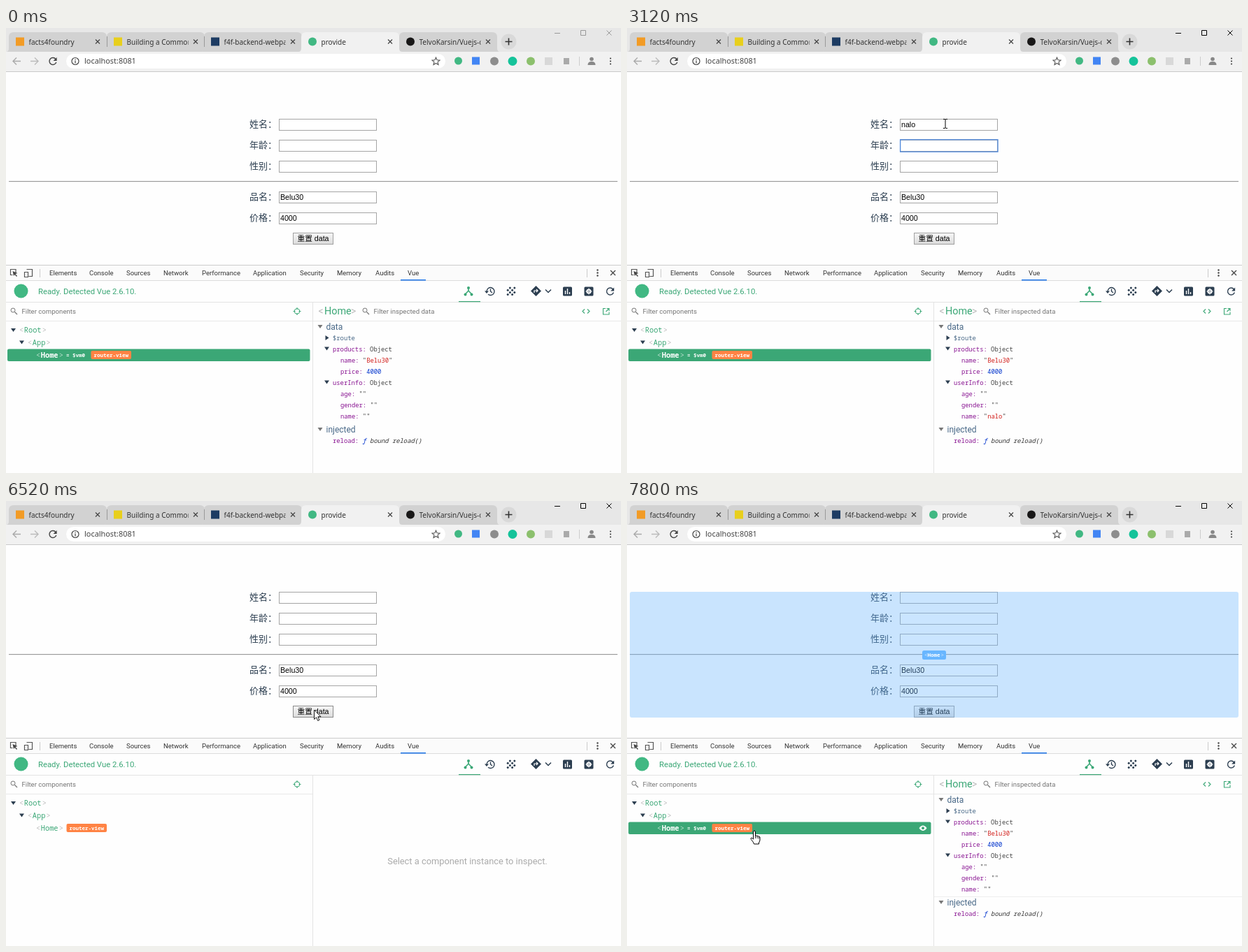
Animation of 879 by 637 pixels, one loop 8000 ms. Source, as an HTML page:

```html
<!DOCTYPE html>
<html lang="zh">
<head>
<meta charset="utf-8">
<title>provide</title>
<style>
html, body { margin: 0; width: 100%; height: 100%; overflow: hidden; background: #fefefe; }
#stage { position: fixed; left: 0; top: 0; }
text { white-space: pre; }
.ui { font-family: "Noto Sans", "Open Sans", sans-serif; }
.rb { font-family: Roboto, sans-serif; }
.mono { font-family: "Noto Sans Mono", "DejaVu Sans Mono", monospace; }
.form { font-family: "Liberation Sans", "Noto Sans CJK SC", "Noto Sans CJK", sans-serif; }
.cjk { font-family: "Noto Sans CJK SC", "Noto Sans CJK", sans-serif; }
.b { font-weight: bold; }
</style>
</head>
<body>
<svg id="stage" width="879" height="637" viewBox="0 0 879 637"></svg>
<script>
const LOOP = 8000;
const GREEN = '#3ba776', DARK = '#2c3e50', KEY = '#881391';
const FIELD_Y = [130, 160, 190, 234, 264];

const esc = s => s.replace(/</g, '&lt;').replace(/>/g, '&gt;');
const text = (x, y, s, size, fill, cls, more = '') =>
  `<text x="${x}" y="${y}" font-size="${size}" fill="${fill}" class="${cls}" ${more}>${esc(s)}</text>`;
const rect = (x, y, w, h, fill, more = '') =>
  `<rect x="${x}" y="${y}" width="${w}" height="${h}" fill="${fill}" ${more}/>`;
const disc = (x, y, r, fill, more = '') => `<circle cx="${x}" cy="${y}" r="${r}" fill="${fill}" ${more}/>`;
const line = (d, stroke, w = 1, more = '') =>
  `<path d="${d}" fill="none" stroke="${stroke}" stroke-width="${w}" ${more}/>`;
const shape = (d, fill, more = '') => `<path d="${d}" fill="${fill}" ${more}/>`;
const at = (x, y, inner) => `<g transform="translate(${x} ${y})">${inner}</g>`;
const group = (id, inner) => `<g id="${id}">${inner}</g>`;
const cross = (x, y, r, color, w) => line(`M${x - r} ${y - r}l${2 * r} ${2 * r}m0 ${-2 * r}l${-2 * r} ${2 * r}`, color, w);
const dots = (x, y, gap, r, fill) => [-1, 0, 1].map(i => disc(x, y + i * gap, r, fill)).join('');
const down = (x, y, fill) => shape(`M${x - 3.5} ${y - 2}h7l-3.5 5z`, fill);
const search = (x, y) => line(`M${x + 1.5} ${y + 1.5}l3.5 3.5`, '#777', 1.3) + disc(x - 1, y - 1, 3, 'none', 'stroke="#777"');
const refresh = (x, y, color) => at(x, y, line('M4 -3A5 5 0 1 0 4.8 1.5', color, 1.4) + shape('M5.6 -5.6v5h-5z', color));

// Coloured monospace runs on one line
const code = (x, y, runs, id = '') => `<text x="${x}" y="${y}" font-size="8.85" class="mono">` +
  runs.map(([s, fill, more = '']) => `<tspan fill="${fill}" ${more}>${esc(s)}</tspan>`).join('') +
  (id && `<tspan id="${id}" fill="#444"></tspan>`) + '</text>';
const tag = (x, y, name, cls = '') => text(x, y, '<', 10.3, '#bbb', 'mono') +
  text(x + 6.8, y, name, 10.3, GREEN, 'mono ' + cls) + text(x + 8 + name.length * 6.2, y, '>', 10.3, '#bbb', 'mono');
const badge = x => rect(x, 462, 57.5, 12, '#ff8344', 'rx="2"') + text(x + 4, 470.6, 'router-view', 7.5, '#fff', 'mono b');

function browserChrome() {
  const tabs = [
    [4, 'facts4foundry', '#f29b25'], [144, 'Building a Common Event', '#e8cf1c'],
    [283, 'f4f-backend-webpack', '#1d3c63'], [562, 'TelvoKarsin/Vuejs-demo', '#181717'], [422, 'provide', '#41b883']];
  const tabSvg = tabs.map(([x, title, color], i) => {
    const bg = i === 4 ? '#f1f1f1' : '#d2d2d2';
    const icon = i > 2 ? disc(x + 16, 19.5, 6, color) : rect(x + 10, 13.5, 12, 12, color);
    return shape(`M${x - 4} 34q4 0 4 -5V13q0 -7 7 -7h126q7 0 7 7v16q0 5 4 5z`, bg) + icon +
      `<svg x="${x + 28.5}" y="8" width="88" height="24">${text(0, 15.5, title, 10, '#333', 'ui')}</svg>` +
      cross(x + 127, 19.5, 3, '#444', 1.2);
  }).join('');
  const ext = disc(646.5, 47, 5.5, '#41b883') + rect(666, 41.5, 11, 11, '#4285f4') + disc(698, 47.5, 6, '#8d8d8d') +
    disc(724, 47.5, 6.5, '#15c39a') + disc(750, 47.5, 6, '#8cc06d') + rect(770, 42, 11, 11, '#d8d8d8') + rect(797, 43, 8, 9, '#aaa');
  return rect(0, 0, 879, 34, '#e7e7e7') + tabSvg + line('M144.5 12v15M283.5 12v15', '#999') +
    disc(718.5, 19.5, 11, '#d9d9d9') + line('M713.5 19.5h10M718.5 14.5v10', '#333', 1.6) +
    group('winButtons', line('M784 7.5h8M821.5 3.5h7v7h-7zM858.5 3.5l7 7m0 -7l-7 7', 'currentColor')) +
    rect(0, 34, 879, 28, '#f1f1f1') + rect(0, 62, 879, 1, '#c9c9c9') +
    line('M21 47.5h-11m5 -5l-5 5l5 5', '#aaa', 1.4) + line('M35 47.5h11m-5 -5l5 5l-5 5', '#bbb', 1.4) + refresh(67, 47.5, '#444') +
    rect(86, 37, 542, 21, '#fff', 'rx="10.5"') + disc(99, 47.5, 5, 'none', 'stroke="#444" stroke-width="1.2"') +
    line('M99 46.5v4M99 44.2v1.2', '#444', 1.2) + text(112, 51.3, 'localhost:8081', 10.9, '#444', 'ui') +
    line('M614.5 42.2l1.5 3.6 4 .3-3 2.6 1 3.8-3.5-2-3.5 2 1-3.8-3-2.6 4-.3z', '#555', 1.1) +
    ext + line('M819.5 41v13', '#ccc') + disc(837, 44.5, 2.8, '#888') + shape('M831.5 53q0 -5 5.5 -5t5.5 5z', '#888') +
    dots(864, 47.5, 4, 1.1, '#444');
}

function page() {
  const labels = ['姓名：', '年龄：', '性别：', '品名：', '价格：'];
  const fixed = ['', '', '', 'Belu30', '4000'];
  return labels.map((label, i) => {
    const y = FIELD_Y[i];
    return text(348, y + 12.4, label, 13, DARK, 'cjk') +
      rect(390.5, y + .5, 139, 16, '#fff', 'stroke="#a5a5a5"') +
      text(392, y + 12, fixed[i], 10.67, '#000', 'form', `id="field${i}"`);
  }).join('') +
    rect(390.6, 129.8, 139.4, 17.4, 'none', 'id="focus" stroke="#4d87dc" stroke-width="1.3"') +
    rect(0, 0, 1, 12.5, '#000', 'id="caret"') + rect(392, 144, 0, 1, '#000', 'id="compose"') +
    rect(4, 219, 870, 1, '#9a9a9a') + rect(4, 220, 870, 1, '#eee') +
    rect(410.5, 293.5, 57, 16, 'url(#btn)', 'id="button" stroke="#a0a0a0"') +
    text(416.5, 305.3, '重置 data', 10.67, '#000', 'form');
}

function devtoolsFrame() {
  const tabs = [[62, 'Elements'], [119, 'Console'], [172, 'Sources'], [225, 'Network'], [280, 'Performance'],
    [353, 'Application'], [420, 'Security'], [473, 'Memory'], [528, 'Audits'], [574, 'Vue']];
  const cells = [0, 1, 2, 3];
  const grain = cells.map(row => cells.filter(col => (row + col) % 2).map(col =>
    disc(717.2 + col * 3.2, 372 + row * 3.2, 1.5, DARK)).join('')).join('');
  return rect(0, 339, 879, 1, '#ccc') + rect(0, 340, 879, 21, '#fbfbfb') + rect(0, 361, 879, 1, '#ddd') +
    line('M14 351v-5.5H6.500v8h3', '#555', 1.2) + shape('M9.500 348l7 3-3 1 2.500 3-1 1-2.500-3-1.500 2z', '#444') +
    line('M29.500 345.500h8v10h-5M26.500 349.500h5v7h-5z', '#555', 1.2) + line('M48.5 345v12M830.5 345v12', '#ccc') +
    tabs.map(([x, s]) => text(x, 354.4, s, 9.5, '#333', 'rb')).join('') + rect(564, 360, 36, 1.5, '#1a73e8') +
    dots(845.5, 350.5, 4, 1.2, '#444') + cross(867.5, 350.5, 3.5, '#444', 1.3) +
    disc(21.500, 376.500, 10, '#41b883') + text(46, 381.4, 'Ready. Detected Vue 2.6.10.', 11.3, GREEN, 'rb') +
    line('M661 371v5l-4.500 5M661 376l4.500 5', GREEN, 1.6) + disc(661, 372, 2, GREEN) + disc(656.5, 381.500, 2, GREEN) + disc(665.5, 381.500, 2, GREEN) +
    line('M687 377a5.500 5.500 0 1 1 2 4.300M692.500 373.500v3.500l2.500 2', DARK, 1.4) + shape('M684 376.500h6l-3 3.500z', DARK) + grain +
    shape('M757.500 369l7.500 7.500-7.500 7.500-7.500-7.500z', DARK) + line('M755 379v-3h4.500m-1.500-2l2 2-2 2', '#fff', 1.2) +
    line('M771 374.500l4 4 4-4', DARK, 1.5) + rect(796, 370.5, 13, 13, DARK, 'rx="1.5"') + line('M799.500 381v-5M802.500 381v-8M805.500 381v-3', '#fff', 1.4) +
    rect(826.5, 370.5, 13, 13, DARK, 'rx="1.5"') + disc(833, 377, 2.7, 'none', 'stroke="#fff" stroke-width="1.8"') +
    line('M833 372.500v9M828.500 377h9', '#fff', .9) + refresh(863.5, 377, DARK) +
    rect(0, 392, 879, 1, '#e3e3e3') + rect(647, 391, 31, 1.2, GREEN) +
    rect(0, 419, 438, 1, '#e9e9e9') + rect(438, 393, 1, 244, '#e3e3e3') +
    search(11, 405) + text(22.5, 408.8, 'Filter components', 9.6, '#757575', 'rb') +
    disc(416, 405.500, 3.8, 'none', `stroke="${GREEN}"`) + line('M416 400v3m0 5v3M410.500 405.500h3m5 0h3', GREEN);
}

function tree() {
  return down(10.5, 432, DARK) + tag(19, 436.3, 'Root') + down(22.5, 449.500, DARK) + tag(31, 454, 'App') +
    group('rowPlain', rect(2, 459.5, 432.5, 17.5, '#e5f3ec', 'rx="2" id="rowHover"') + tag(43, 471.7, 'Home') + badge(86.5)) +
    group('rowSelected', rect(2, 459.5, 432.5, 17.5, GREEN, 'rx="2"') +
      text(43, 471.7, '<', 10.3, '#b9e0cd', 'mono') + text(49.8, 471.7, 'Home', 10.3, '#fff', 'mono b') +
      text(75.8, 471.7, '>', 10.3, '#b9e0cd', 'mono') + text(86, 471.2, '= $vm0', 7.5, '#fff', 'mono b') + badge(121.5)) +
    group('eye', shape('M417.500 468.300q5.500-7.500 11 0q-5.500 7.500-11 0z', '#fff') + disc(423, 468.300, 2, GREEN));
}

function inspector() {
  const empty = text(659.5, 519.5, 'Select a component instance to inspect.', 12.85, '#aaa', 'rb', 'text-anchor="middle"');
  const obj = (y, name) => down(458.5, y - 4, DARK) + code(467, y, [[name + ':', KEY], [' Object', '#444']]);
  return group('empty', empty) + group('details',
    rect(439, 419, 440, 1, '#e9e9e9') + text(446.5, 410, '<', 14, '#bbb', 'rb') + text(455, 410, 'Home', 14.4, GREEN, 'rb') +
    text(493, 410, '>', 14, '#bbb', 'rb') + search(514, 405) + text(525.5, 408.8, 'Filter inspected data', 9.6, '#757575', 'rb') +
    line('M827 402.500l-3 3 3 3M831 402.500l3 3-3 3', GREEN, 1.1) + line('M857 401.500h-3.500v8.500h8.500v-3.500M857.500 406l4.500-4.500m-3.500 0h3.500v3.500', GREEN, 1.1) +
    down(449, 427, '#777') + text(457.5, 431.5, 'data', 12, '#486887', 'rb') +
    shape('M456.500 440l5 3.500-5 3.500z', DARK) + code(467, 446.6, [['$route', '#486887']]) +
    obj(462.6, 'products') + code(478, 478.6, [['name: ', KEY], ['"', '#444'], ['Belu30', '#d2201c'], ['"', '#444']]) +
    code(478, 494.6, [['price: ', KEY], ['4000', '#0033cc']]) + obj(510.6, 'userInfo') +
    code(478, 526.6, [['age: ', KEY]], 'dev1') + code(478, 542.6, [['gender: ', KEY]], 'dev2') + code(478, 558.6, [['name: ', KEY]], 'dev0') +
    rect(439, 566, 440, 1, '#eee', 'id="rule"') +
    down(449, 574, '#777') + text(457.5, 578.5, 'injected', 12, '#486887', 'rb') +
    code(467, 593.6, [['reload: ', KEY], ['ƒ', '#0033cc', 'font-style="italic"'], [' bound reload()', '#333', 'font-style="italic"']]));
}

function overlay() {
  return group('overlay', rect(4, 130, 870, 180, 'rgba(104,182,255,.35)', 'rx="3"') +
    rect(422, 214, 34, 13, '#68b6ff', 'rx="2.5"') + text(425, 223, '<', 7.5, '#d5eaff', 'mono') +
    text(429.5, 223, 'Home', 7.5, '#fff', 'mono b') + text(448.5, 223, '>', 7.5, '#d5eaff', 'mono'));
}

const cursors = group('cursor',
  group('arrow', shape('M.5 0V13.500L3.500 10.700L5.700 15.500L7.900 14.500L5.800 9.800H10Z', '#fff', 'stroke="#000" stroke-width=".9"')) +
  group('beam', line('M-3 -6.500h2.300l.7 .7 .7 -.7h2.300M0 -6v12M-3 6.500h2.300l.7 -.7 .7 .7h2.300', '#000')) +
  group('hand', shape('M-1.500 1q0 -2 1.500 -2t1.500 2v5q4 0 6.500 2v4q0 2 -1.500 4v2h-7q-.5 -2.500 -4 -6.500q-1.500 -2 .2 -2.300q1.500 0 2.800 2z', '#fff', 'stroke="#000" stroke-width="1"') +
    line('M1.500 6v4M4 7v3M6.200 7.500v3', '#000', .8)));

const stage = document.getElementById('stage');
stage.innerHTML = `<defs><linearGradient id="btn" x2="0" y2="1"><stop stop-color="#f6f6f6"/><stop offset="1" stop-color="#dcdcdc"/></linearGradient></defs>` +
  browserChrome() + page() + devtoolsFrame() + tree() + inspector() + overlay() + cursors;

const $ = id => document.getElementById(id);
const show = (id, on) => $(id).setAttribute('visibility', on ? 'visible' : 'hidden');
const move = (id, attrs) => { for (const k in attrs) $(id).setAttribute(k, attrs[k]); };
const pick = (steps, t) => steps.reduce((v, s) => s[0] <= t ? s[1] : v, steps[0][1]);

// Each entry: word, key times, and when the inspector shows each key
const typed = [
  { word: 'nalo', keys: [1610, 1750, 1880, 2020], mirror: () => 2350 },
  { word: '20', keys: [3190, 3260], mirror: k => k + 60 },
  { word: 'male', keys: [4110, 4230, 4340, 4450], mirror: k => k + 70 }
];
const RESET = 6450, CLEARED = 6520, HOVER = 7610, SELECT = 7750, INSPECT = 7800;
const focusSteps = [[0, -1], [770, 0], [2610, 1], [3750, 2], [6380, -1]];
const caretSteps = [[0, 0], [770, 1], [1270, 0], [1610, 1], [3120, 0], [3190, 1], [5030, 0], [5590, 1], [6080, 0]];
const cursorSteps = [[0, ''], [80, 'arrow'], [680, 'beam'], [5680, 'arrow'], [HOVER, 'hand']];
const path = [
  [80, 700, 597], [380, 570, 350], [600, 462, 160], [720, 455, 137], [5540, 455, 137], [5590, 459, 140],
  [5800, 464, 205], [5960, 450, 275], [6080, 441, 299], [6180, 441, 299], [6230, 440, 299], [7060, 440, 299],
  [7160, 330, 375], [7290, 155, 485], [7400, 152, 491], [7560, 172, 482], [7660, 181, 475], [7800, 182, 473]];

function pointer(t) {
  const i = path.findIndex(p => p[0] > t);
  if (i < 0) return path[path.length - 1].slice(1);
  if (!i) return path[0].slice(1);
  const a = path[i - 1], b = path[i], k = (t - a[0]) / (b[0] - a[0]);
  return [1, 2].map(n => Math.round(a[n] + (b[n] - a[n]) * k));
}

function render(t) {
  typed.forEach(({ word, keys, mirror }, i) => {
    const n = t < RESET ? keys.filter(k => k <= t).length : 0;
    const m = t < CLEARED ? keys.filter(k => mirror(k) <= t).length : 0;
    $('field' + i).textContent = word.slice(0, n);
    $('dev' + i).innerHTML = `"<tspan fill="#d2201c">${word.slice(0, m)}</tspan>"`;
  });

  const focus = pick(focusSteps, t), focused = focus >= 0;
  show('focus', focused);
  show('caret', focused && pick(caretSteps, t));
  if (focused) {
    const width = $('field' + focus).getComputedTextLength();
    move('focus', { y: FIELD_Y[focus] - .2 });
    move('caret', { x: Math.round(392 + width), y: FIELD_Y[focus] + 2 });
    move('compose', { width: t >= 1610 && t < 2300 ? width : 0 });
  }
  const overButton = t >= 6040 && t < 7110;
  move('button', { stroke: overButton ? '#8a8a8a' : '#a0a0a0', fill: t >= 6380 && t < RESET ? '#e0e0e0' : 'url(#btn)' });
  $('winButtons').style.color = t < 770 ? '#999' : '#000';

  const hover = t >= HOVER, selected = t < CLEARED || t >= SELECT, details = t < CLEARED || t >= INSPECT;
  show('rowPlain', !selected);
  show('rowHover', hover && !selected);
  show('rowSelected', selected);
  show('eye', hover);
  show('overlay', hover);
  show('empty', !details);
  show('details', details);
  show('rule', t >= INSPECT);

  const kind = pick(cursorSteps, t);
  ['arrow', 'beam', 'hand'].forEach(id => show(id, id === kind));
  move('cursor', { transform: `translate(${pointer(t)})` });
}

const start = performance.now();
function tick() {
  render((performance.now() - start) % LOOP);
  requestAnimationFrame(tick);
}
tick();
</script>
</body>
</html>
```
